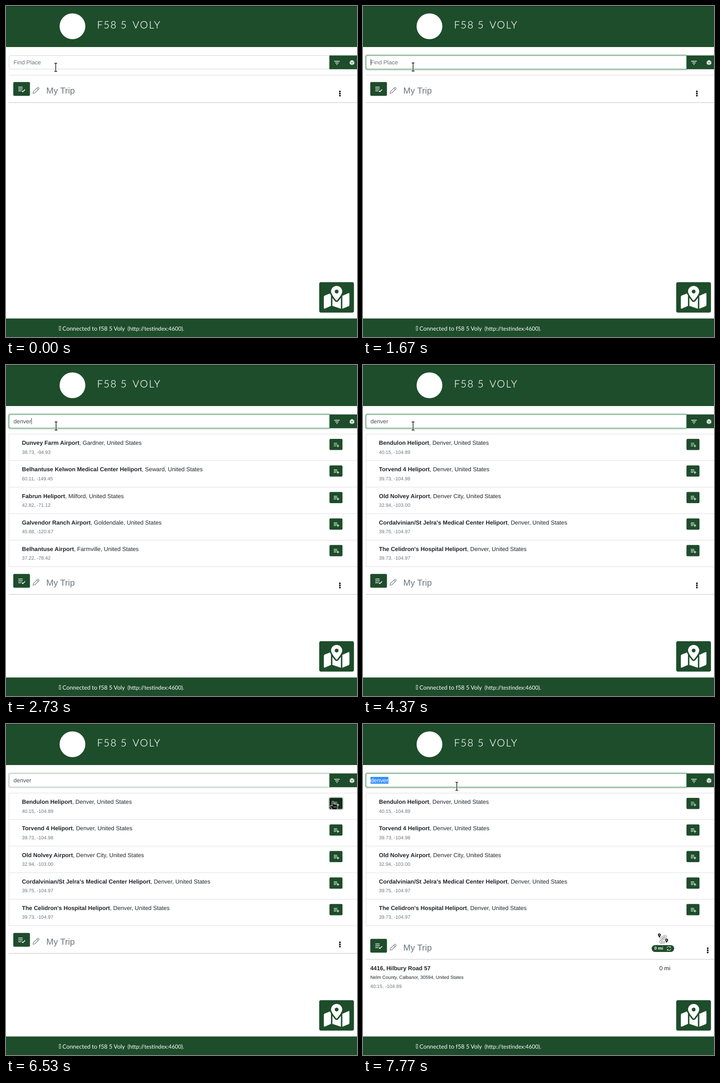
Animation of 771x726 px, one loop 8 s. Source, as an HTML page:

```html
<!DOCTYPE html>
<html lang="en">
<head>
<meta charset="utf-8">
<title>Trip planner</title>
<style>
  html, body { margin: 0; width: 100%; height: 100%; overflow: hidden; background: #fff; }
  svg { display: block; font: 12.74px "Liberation Sans", Arial, sans-serif; fill: #212529; text-rendering: geometricPrecision; }
  text { white-space: pre; }
  .bold { font-weight: 700; }
  .green { fill: #1e4d2b; }
  .white { fill: #fff; }
  .muted { fill: #6c757d; }
  .small { font-size: 10.68px; }
  .line { fill: none; stroke: #dcdee0; }
  .icon { fill: none; stroke: #fff; stroke-width: 1.4; }
  .brand { font-family: Lato, sans-serif; fill: #fff; }
  .title { font-size: 22px; font-weight: 300; letter-spacing: 2.2px; stroke: #fff; stroke-width: .25; }
  .cursor { stroke: #fff; stroke-linejoin: round; fill: #000; }
</style>
</head>
<body>
<svg width="771" height="726" viewBox="0 0 771 726">
  <rect class="green" width="771" height="90"/>
  <rect width="771" height="1" fill="#1b2a20"/>
  <circle class="white" cx="146" cy="44.5" r="28.3"/>
  <g class="brand title">
    <text x="200" y="49">F58</text><text x="252" y="49">5</text><text x="278" y="49">VOLY</text>
  </g>
  <rect class="green" y="685.4" width="771" height="41"/>
  <rect x="117" y="702.5" width="3" height="9" fill="none" stroke="#fff" stroke-width=".8"/>
  <g class="brand" font-size="12.8">
    <text x="124" y="712">Connected to f58 5 Voly</text><text x="267" y="712" font-size="12.3">(http://testindex:4600).</text>
  </g>
  <g id="scene"></g>
  <rect class="green" x="688" y="605.7" width="76.3" height="66.8" rx="4"/>
  <path class="white" transform="translate(698.2 614) scale(.0975)" d="M20 216A32 32 0 0 0 0 246V496c0 11 11 19 22 15L160 448V215c-9-16-16-32-21-46zM288 360c-14 0-27-6-36-17-20-23-41-50-60-77v182l192 64V266c-19 27-40 54-60 77-9 11-22 17-36 17zM554 161 416 224v288l140-56a32 32 0 0 0 20-30V176c0-11-11-19-22-15zM288 0C218 0 162 56 162 126c0 56 82 159 114 196 6 8 18 8 24 0C332 285 414 182 414 126 414 56 358 0 288 0zm0 168a42 42 0 1 1 0-84 42 42 0 0 1 0 84z"/>
  <g id="pointer"></g>
</svg>
<script>
const LOOP = 8000, ROW = 58.2;
const QUERY = "denver", KEY_TIMES = [1800, 1830, 2030, 2170, 2470, 2600];
const CARET_STOPS = [0, .556, 1.112, 1.668, 2.168, 2.724, 3.057];
const CARET_ON = [[500, 1100], [1670, 3200], [3800, 4370], [4970, 5570]];
const RESULTS_AT = 2730, ADDED_AT = 6650;

const bendulon = ["Bendulon Heliport", "Denver", "40.15, -104.89"];
const torvend = ["Torvend 4 Heliport", "Denver", "39.73, -104.98"];
const nolvey = ["Old Nolvey Airport", "Denver City", "32.94, -103.00"];
const jelra = ["Cordalvinian/St Jelra's Medical Center Heliport", "Denver", "39.75, -104.97"];
const celidron = ["The Celidron's Hospital Heliport", "Denver", "39.73, -104.97"];
const tessalinder = ["Tessalinder Park Medical Center Heliport", "Denver", "39.74, -104.94"];
const RESULTS = [
  [RESULTS_AT, [
    ["Dunvey Farm Airport", "Gardner", "38.73, -94.93"],
    ["Belhantuse Kelwon Medical Center Heliport", "Seward", "60.11, -149.45"],
    ["Fabrun Heliport", "Milford", "42.82, -71.12"],
    ["Galvendor Ranch Airport", "Goldendale", "45.88, -120.67"],
    ["Belhantuse Airport", "Farmville", "37.22, -78.42"]]],
  [2870, [celidron, tessalinder, torvend, jelra, bendulon]],
  [3200, [bendulon, torvend, nolvey, jelra, celidron]],
];

const scene = document.getElementById("scene");
const pointer = document.getElementById("pointer");

const ramp = (t, start, length) => Math.min(1, Math.max(0, (t - start) / length));
const smooth = p => p * p * (3 - 2 * p);
const mix = (a, b, p) => a + (b - a) * p;
const text = (x, y, content, cls = "", extra = "") =>
  `<text x="${x}" y="${y}" class="${cls}" ${extra}>${content}</text>`;
const box = (x, y, w, h, r, attrs) =>
  `<rect x="${x}" y="${y}" width="${w}" height="${h}" rx="${r}" ${attrs}/>`;
const path = (d, attrs) => `<path d="${d}" ${attrs}/>`;

function searchBar(t, focus) {
  const typed = KEY_TIMES.filter(k => t >= k).length;
  const selected = t >= 7650;
  const caret = CARET_ON.some(([on, off]) => t >= on && t < off);
  const field = "M710.6 108.7H9.7a3 3 0 0 0-3 3v23.6a3 3 0 0 0 3 3h700.9z";
  return path(field, 'fill="#fff" stroke="#ced4da"')
    + box(710.3, 108.4, 61, 30.3, 0, 'class="green"')
    + path("M721 121.3h12M723.3 124.8h7.4M725.8 128.2h2.4", 'class="icon"')
    + path("M760 118.6l4.9 2.8v5.6l-4.9 2.8-4.9-2.8v-5.6z", 'class="white"')
    + path("M760 129v-4.6l-4-2.3M760 124.4l4-2.3M760 121v.1M757.5 126v.1M762.5 126v.1",
      'fill="none" stroke="#1e4d2b" stroke-width=".9" stroke-linecap="round"')
    + box(5.2, 107.2, 707.2, 32.7, 4, `fill="none" stroke="#1e4d2b" stroke-width="2.5" opacity="${.25 * focus}"`)
    + path(field, `fill="none" stroke="#4fa66c" stroke-width="1.1" opacity="${focus}"`)
    + (selected ? box(16.5, 116, 39.3, 15, 0, 'fill="#3390ff"') : "")
    + (typed ? text(16.5, 127.7, QUERY.slice(0, typed), "", `style="fill:${selected ? "#fff" : "#495057"}"`)
             : text(16.5, 127.7, "Find Place", "muted"))
    + (caret ? box(16.7 + 12.74 * CARET_STOPS[typed], 116, 1, 14, 0, 'fill="#343a40"') : "");
}

function resultRow([name, town, place], i, active, ring) {
  return `<g transform="translate(0 ${i * ROW})">`
    + text(35, 175.3, `<tspan class="bold">${name}</tspan>, ${town}, United States`)
    + text(35, 194.6, place, "muted small")
    + box(709.3, 160.8, 31, 27, 4, `fill="none" stroke="#1e4d2b" stroke-width="2.6" opacity="${.4 * ring}"`)
    + box(710.5, 162, 28.6, 24.6, 2.5, `fill="${active ? "#122e1a" : "#1e4d2b"}"`)
    + path("M720 171.5h7.5M720 174.5h7.5M720 177.5h5M729 174.5v6M726 177.5h6", 'class="icon" style="stroke-width:1.2"')
    + path(`M6 ${151.5 + ROW}H771`, 'class="line"') + "</g>";
}

function tripBar(shift, added) {
  const dotX = added ? 757.2 : 733.4;
  const dots = [187.4, 192, 196.6].map(y => `<circle cx="${dotX}" cy="${y}" r="1.9" fill="#111"/>`).join("");
  return `<g transform="translate(0 ${shift})">`
    + box(16, 166.8, 36.6, 30.2, 2.5, 'class="green"')
    + path("M27 178h9.5M27 182h9.5M27 186h6M34.5 185.5l2.5 2.5 5-5", 'class="icon" style="stroke-width:1.7"')
    + path("M59.3 191.7l1.2-4.3 8.8-8.6q1.2-1 2.2 0l.8.8q1 1.2 0 2.2l-8.7 8.7zM67.8 180.3l3 3",
      'fill="none" stroke="#6c757d" stroke-width="1.1" stroke-linejoin="round"')
    + text(88.5, 192, "My Trip", "muted", 'font-size="19.1"') + dots
    + path("M6 211.8H771", 'class="line" style="stroke:#d3d5d7;stroke-width:1.6"') + "</g>";
}

function tripStop() {
  const pin = (x, y) => path(`M${x} ${y + 6.5}l-2.3-4.5a3.1 3.1 0 1 1 4.6 0zM${x} ${y - 1.2}a1.2 1.2 0 1 0 .01 0z`,
    'fill="#111" fill-rule="evenodd"');
  const road = "M652 469.5c5 1 10-7 13-4s-14 9-12 13 6-2 11 1";
  return path(road, 'fill="none" stroke="#555" stroke-width="3.4"')
    + path(road, 'fill="none" stroke="#fff" stroke-width="2"')
    + pin(651, 462.5) + pin(667, 473.8)
    + box(634, 485, 49.5, 15, 7.5, 'class="green"')
    + text(640, 495.4, "0 mi", "bold white", 'font-size="9.6"')
    + path("M667.7 491.5a4.3 4.3 0 0 1 8-1.5v-2.3M676.3 493a4.3 4.3 0 0 1-8 1.5v2.3M675.7 490h-2.4M668.3 494.5h2.4",
      'class="icon" style="stroke-width:1"')
    + text(16, 540.4, "4416, Hilbury Road 57", "bold") + text(651, 540.4, "0 mi")
    + text(16, 559.4, "Nelm County, Calbanor, 30594, United States", "", 'font-size="10.16"')
    + text(16, 578.6, "40.15, -104.89", "muted small");
}

function sceneAt(t) {
  const blur = ramp(t, 6440, 150), refocus = ramp(t, 7580, 150);
  const focus = ramp(t, 420, 150) - blur + refocus;
  const hasResults = t >= RESULTS_AT, added = t >= ADDED_AT;
  let out = searchBar(t, focus) + path("M6 151.5H771", 'class="line"');
  if (hasResults) {
    const rows = RESULTS.filter(([start]) => t >= start).pop()[1];
    const active = t >= 5310 && t < 7590;
    out += path("M6.5 151.5V442.5", 'class="line"')
      + rows.map((row, i) => resultRow(row, i, !i && active, i ? 0 : blur - refocus)).join("");
  }
  return out + tripBar(added ? 304.5 : hasResults ? 291.5 : 0, added) + (added ? tripStop() : "");
}

const beam = "M-3-9h2l1 1 1-1h2M-3 9h2l1-1 1 1h2M0-8V8";
const CURSORS = {
  beam: path(beam, 'fill="none" stroke="#fff" stroke-width="3"')
    + path(beam, 'fill="none" stroke="#111" stroke-width="1.4"'),
  arrow: path("M0-1V17.5l4.2-3.7 3.2 7 3-1.3-3.1-6.7h5.7z", 'class="cursor"'),
  hand: path("M-1.5 0q1.7-1.8 3.2 0V6q2-1.4 3.2.4 2-1 3 .7 2.4-.6 2.6 1.8v4l-1.6 4.5H-.8L-6 10.5q-.5-2 1.6-2l2.9 2z",
    'class="cursor"')
    + path("M2.3 10v4M5 10v4M7.6 10v4", 'stroke="#fff" stroke-width=".8"'),
};

function pointerAt(t) {
  const out = smooth(ramp(t, 4730, 640));
  const back = ramp(t, 6600, 600);
  let x = mix(t < 400 ? 109.3 : 110, 718, out), y = mix(t < 400 ? 134.5 : 133.7, 170, out);
  if (back > 0) {
    x = mix(718, 206, 1 - (1 - back) ** 3);
    y = mix(170, 136.6, smooth(back));
  }
  const shape = x >= 710 && y > 162 ? "hand" : y < 139 && x < 710 ? "beam" : "arrow";
  return `<g transform="translate(${x} ${y})">${CURSORS[shape]}</g>`;
}

let lastScene = "";
function draw(now) {
  const t = now % LOOP;
  const next = sceneAt(t);
  if (next !== lastScene) scene.innerHTML = lastScene = next;
  pointer.innerHTML = pointerAt(t);
  requestAnimationFrame(draw);
}
draw(0);
</script>
</body>
</html>
```
